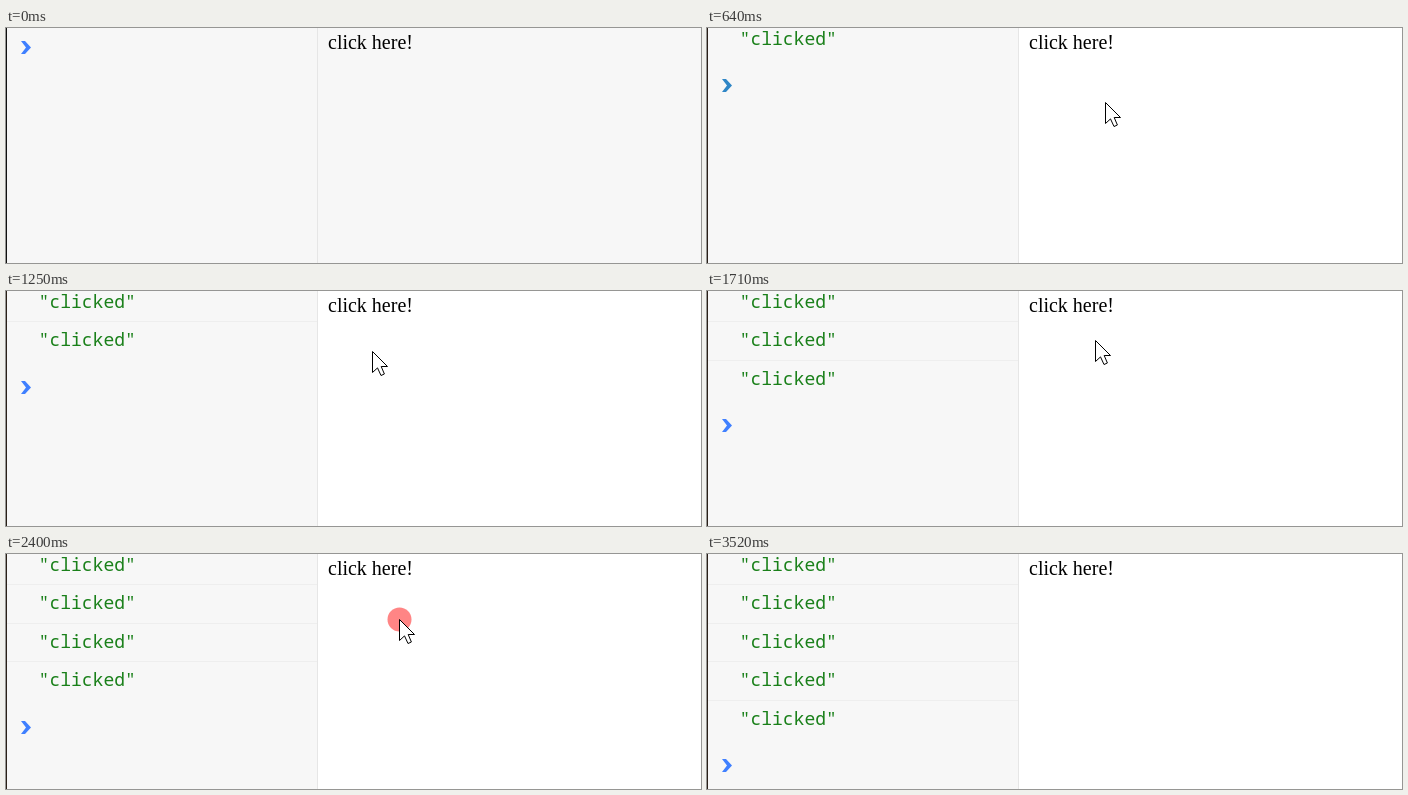
An HTML page for the animation above (3550 ms loop, 695 by 235 pixels).

```html
<!DOCTYPE html>
<html lang="en">
<head>
<meta charset="utf-8">
<title>Click log</title>
<style>
html, body { margin: 0; width: 100%; height: 100%; overflow: hidden; background: #f7f7f7; }
svg { display: block; }
.page { font: 20px "Liberation Serif", "Times New Roman", serif; }
.log { font: 18px "Noto Sans Mono", "DejaVu Sans Mono", monospace; fill: #1a801a; }
</style>
</head>
<body>
<svg width="695" height="235">
  <rect width="695" height="235" fill="#f7f7f7"/>
  <rect id="panel" x="312" width="383" height="235"/>
  <rect x="311" width="1" height="235" fill="#e6e6e6"/>
  <rect id="edge" width="1" height="235"/>
  <g id="rows"></g>
  <path id="prompt" d="M15 -6.5h4l6 6.5l-6 6.5h-4l5 -6.5z"/>
  <text class="page" x="322" y="21">click here!</text>
  <g id="pointer">
    <circle id="press" cx=".5" cy=".5" r="12" fill="red" fill-opacity=".48"/>
    <path d="M.5 .5v21l5 -4.6l3.5 7.6l3.4 -1.5l-3.2 -7.5h6.3z" fill="white" stroke="black"/>
  </g>
</svg>
<script>
const LOOP = 3550, PITCH = 38.4, STEP = 45;
const $ = id => document.getElementById(id);

// start, end, destination x, y
const moves = [
  [100, 100, 501, 157], [100, 180, 429, 112], [340, 460, 398, 74],
  [800, 970, 387, 66], [970, 1150, 366, 60], [1250, 1350, 363, 57],
  [1430, 1530, 371, 52], [1630, 1710, 388, 49], [1710, 1940, 433, 66],
  [1990, 2190, 393, 65], [2684, 2960, 672, 244]
];

// press, release
const clicks = [[540, 640], [1150, 1250], [1530, 1630], [2190, 2290], [2400, 2500]];
const offstage = [3470, 3520];

function add(parent, tag, attrs, text = "") {
  const el = document.createElementNS("http://www.w3.org/2000/svg", tag);
  for (const key in attrs) el.setAttribute(key, attrs[key]);
  el.textContent = text;
  return parent.appendChild(el);
}

const rows = clicks.map((_, i) => {
  const row = add($("rows"), "g", {});
  if (i) add(row, "rect", {
    x: 1, y: Math.floor(30.8 + PITCH * (i - 1)), width: 310, height: 1, fill: "#eee"
  });
  add(row, "text", { class: "log", x: 32.6, y: Math.round(17 + PITCH * i) }, '"clicked"');
  return row;
});

// The pointer advances in short even hops, as a screen recorder samples it.
function pointerAt(t) {
  let x = 0, y = 300;
  for (const [from, to, toX, toY] of moves) {
    if (t < from) break;
    const hops = Math.max(1, Math.round((to - from) / STEP));
    const part = t >= to ? 1 : Math.floor((t - from) / (to - from) * hops + 1e-6) / hops;
    x += (toX - x) * part;
    y += (toY - y) * part;
  }
  return [Math.round(x), Math.round(y)];
}

const set = (id, key, value) => $(id).setAttribute(key, value);

function draw(t) {
  const white = t >= 410;
  const count = clicks.filter(c => t >= c[1]).length;
  const down = [...clicks, offstage].some(([on, off]) => t >= on && t < off);
  set("panel", "fill", white ? "#fff" : "#f7f7f7");
  set("edge", "fill", white ? "#2a2018" : "#111");
  rows.forEach((row, i) => row.setAttribute("display", i < count ? "inline" : "none"));
  set("prompt", "transform", `translate(0 ${Math.floor(19.5 + PITCH * count) + .5})`);
  set("prompt", "fill", count === 1 ? "#2f86c6" : "#4080ff");
  set("pointer", "transform", `translate(${pointerAt(t)})`);
  set("press", "display", down ? "inline" : "none");
}

const start = performance.now();
function tick() {
  draw((performance.now() - start) % LOOP);
  requestAnimationFrame(tick);
}
tick();
</script>
</body>
</html>
```
